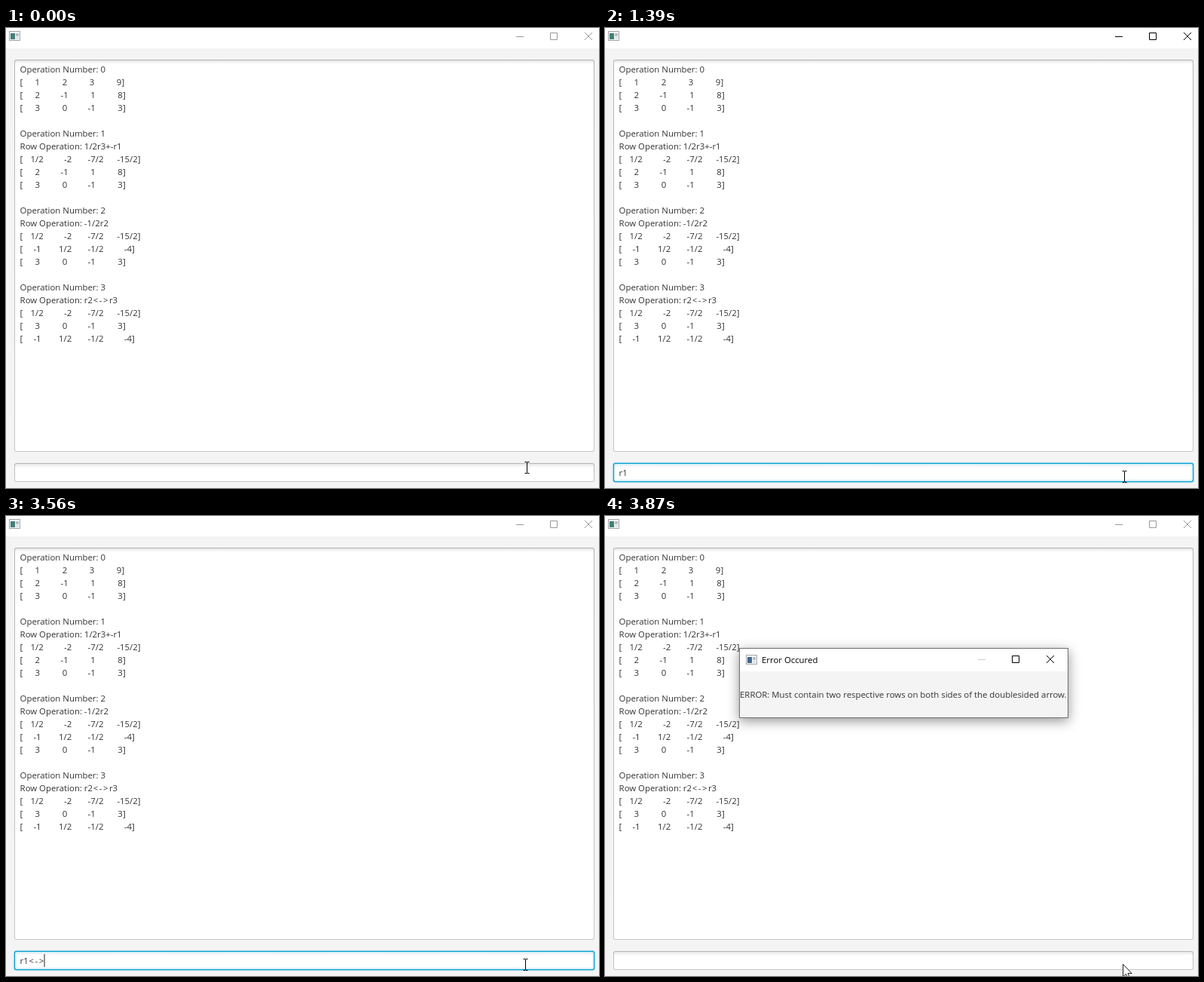
Recreate the animation shown at these times as an HTML page. Size 787x610 px, loop 4.95 s.

```html
<!DOCTYPE html>
<html lang="en">
<head>
<meta charset="utf-8">
<title>Row operations</title>
<style>
  html, body { margin: 0; width: 100%; height: 100%; overflow: hidden; background: #f4f4f4; }
  svg { display: block; }
  text { font: 11.4px "Open Sans", "Noto Sans", sans-serif; fill: #333; }
  .cell { text-anchor: end; }
  .arrow { letter-spacing: 1.5px; }
  .buttons { fill: none; stroke: #000; }
  .inactive .buttons { stroke: #999; }
  #dialog { transform-box: view-box; transform-origin: 396.5px 222px; }
  #frame { filter: drop-shadow(0 4px 8px rgba(0, 0, 0, .42)); }
</style>
</head>
<body>
<svg width="787" height="610" viewBox="0 0 787 610">
  <defs>
    <linearGradient id="edge" x2="0" y2="1">
      <stop stop-color="#b4b4b4"/><stop offset="1" stop-color="#c8c8c8"/>
    </linearGradient>
    <linearGradient id="areaFill" gradientUnits="userSpaceOnUse" x1="0" x2="0" y1="43" y2="48">
      <stop stop-color="#e8e8e8"/><stop offset="1" stop-color="#fff"/>
    </linearGradient>
    <linearGradient id="fieldFill" gradientUnits="userSpaceOnUse" x1="0" x2="0" y1="578" y2="583">
      <stop stop-color="#e8e8e8"/><stop offset="1" stop-color="#fff"/>
    </linearGradient>
    <g id="icon">
      <rect x=".5" y=".5" width="14" height="12" fill="#f6f6f6" stroke="#a0a5a8"/>
      <rect x="2" y="3" width="6" height="8" fill="currentColor"/>
      <rect x="9" y="3" width="4" height="4" fill="#b9c0c4"/>
      <rect x="9" y="8" width="4" height="3" fill="#dfe3e5"/>
    </g>
    <path id="minimize" d="M-5 .5H5"/>
    <path id="maximize" d="M-4.5-4.5h9v9h-9z"/>
    <path id="close" d="M-5-5L5 5M5-5L-5 5"/>
  </defs>

  <g id="window">
    <rect width="787" height="610" fill="#f4f4f4"/>
    <rect width="787" height="27" fill="#fff"/>
    <use href="#icon" x="4" y="4" color="#437f78"/>
    <g class="buttons">
      <use href="#minimize" x="682" y="11"/>
      <use href="#maximize" x="727" y="11"/>
      <use href="#close" x="773" y="11"/>
    </g>
  </g>

  <rect x="11" y="42" width="770" height="520" rx="3" fill="url(#edge)"/>
  <rect x="12" y="43" width="768" height="518" rx="2" fill="url(#areaFill)"/>
  <g id="log"></g>

  <g id="idleField">
    <rect x="11" y="577" width="770" height="25" rx="3" fill="url(#edge)"/>
    <rect x="12" y="578" width="768" height="23" rx="2" fill="url(#fieldFill)"/>
  </g>
  <g id="focusedField">
    <rect x="10.8" y="576.8" width="770.4" height="25.4" rx="3" fill="#039ed3"/>
    <rect x="12" y="578" width="768" height="23" rx="2" fill="#fff"/>
    <rect x="9.6" y="575.6" width="772.8" height="27.8" rx="4" fill="#039ed3" fill-opacity=".133"/>
    <rect x="14" y="580" width="764" height="19" fill="url(#fieldFill)"/>
  </g>
  <text x="18.6" y="594"><tspan id="typedRow"></tspan><tspan id="typedArrow" class="arrow" dx=".7"></tspan></text>
  <rect id="caret" y="581" width="1" height="17" fill="#222"/>

  <g id="dialog">
    <rect id="frame" x="178" y="175" width="437" height="93" fill="#707070"/>
    <rect x="179" y="176" width="435" height="30" fill="#fff"/>
    <rect x="179" y="206" width="435" height="61" fill="#f4f4f4"/>
    <use href="#icon" x="187" y="184" color="#41688f"/>
    <text x="208" y="195" style="fill:#000">Error Occured</text>
    <g class="buttons">
      <use href="#minimize" x="500" y="190" stroke="#ccc"/>
      <use href="#maximize" x="545" y="190"/>
      <use href="#close" x="591" y="190"/>
    </g>
    <text x="179" y="241">ERROR: Must contain two respective rows on both sides of the doublesided arrow.</text>
  </g>

  <path id="beam" d="M-3-7.5h2.5l.5.5l.5-.5h2.5M0-7V7M-3 7.5h2.5l.5-.5l.5.5h2.5" fill="none" stroke="#000"/>
  <path id="pointer" d="M687.5 594.5v16.5l3.8-3.6l2.6 5.6l2.4-1l-2.4-5.5h5.2z" fill="#fff" stroke="#222"/>
</svg>

<script>
const LOOP = 4950;
const LEFT = 18.6;
const $ = id => document.getElementById(id);

// Each operation: its description, then the matrix rows after it.
const operations = [
  ['', '1 2 3 9', '2 -1 1 8', '3 0 -1 3'],
  ['1/2r3+-r1', '1/2 -2 -7/2 -15/2', '2 -1 1 8', '3 0 -1 3'],
  ['-1/2r2', '1/2 -2 -7/2 -15/2', '-1 1/2 -1/2 -4', '3 0 -1 3'],
  ['r2<->r3', '1/2 -2 -7/2 -15/2', '3 0 -1 3', '-1 1/2 -1/2 -4'],
];

const advance = { ' ': 3.29, '-': 4.8, '/': 4.68, '[': 3.62 };
const widthOf = s => [...s].reduce((sum, c) => sum + (advance[c] ?? 6.47), 0);

function buildLog() {
  let y = 59, markup = '';
  const put = (x, s, cls = '') => markup += `<text x="${x}" y="${y}" class="${cls}">${s}</text>`;
  const line = s => { put(LEFT, s); y += 17; };

  operations.forEach(([description, ...rows], number) => {
    line(`Operation Number: ${number}`);
    if (description) {
      line('Row Operation: ' + description.replace('<->', '<tspan class="arrow" dx=".7">&lt;-&gt;</tspan>'));
    }
    for (const row of rows) {
      let x = LEFT + widthOf('[');
      put(LEFT, '[');
      row.split(' ').forEach((value, column) => {
        x += widthOf(value.padStart(column ? 10 : 6));
        put(x, value, 'cell');
      });
      put(x, ']');
      y += 17;
    }
    y += 17;
  });
  $('log').innerHTML = markup;
}

// Latest value whose start time has passed.
const at = (t, steps) => steps.findLast(([start]) => t >= start)[1];
const show = (id, visible) => $(id).style.display = visible ? '' : 'none';

const active = [[0, false], [60, true], [3560, false]];
const focused = [[0, false], [60, true], [3630, false]];
const typedCount = [[0, 0], [440, 1], [840, 2], [1460, 3], [2090, 4], [3390, 5], [3630, 0]];
const caretOn = [[0, false], [290, true], [1390, false], [1460, true], [1940, false],
  [2090, true], [2550, false], [3100, true], [3630, false]];
const beamPosition = [[0, [691, 583]], [140, [695, 598]], [290, [689, 595]]];
const dialogPose = [[0, [0, 1]], [3630, [.3, .95]], [3710, [.7, .986]], [3790, [.93, .997]], [3870, [1, 1]]];
const caretX = [18.6, 22.8, 29.3, 37.5, 42.3, 50.5];

function render(t) {
  const count = at(t, typedCount);
  const hasFocus = at(t, focused);
  const [opacity, scale] = at(t, dialogPose);
  const [beamX, beamY] = at(t, beamPosition);

  $('window').setAttribute('class', at(t, active) ? '' : 'inactive');
  show('focusedField', hasFocus);
  show('idleField', !hasFocus);

  const typed = 'r1<->'.slice(0, count);
  $('typedRow').textContent = typed.slice(0, 2);
  $('typedArrow').textContent = typed.slice(2);
  show('caret', at(t, caretOn));
  $('caret').setAttribute('x', caretX[count]);

  show('dialog', opacity > 0);
  $('dialog').style.opacity = opacity;
  $('dialog').style.transform = scale === 1 ? 'none' : `scale(${scale})`;

  show('beam', t < 3630);
  $('beam').setAttribute('transform', `translate(${beamX + .5} ${beamY})`);
  show('pointer', t >= 3630);
}

buildLog();
const start = performance.now();
function tick() {
  render((performance.now() - start) % LOOP);
  requestAnimationFrame(tick);
}
tick();
</script>
</body>
</html>
```
